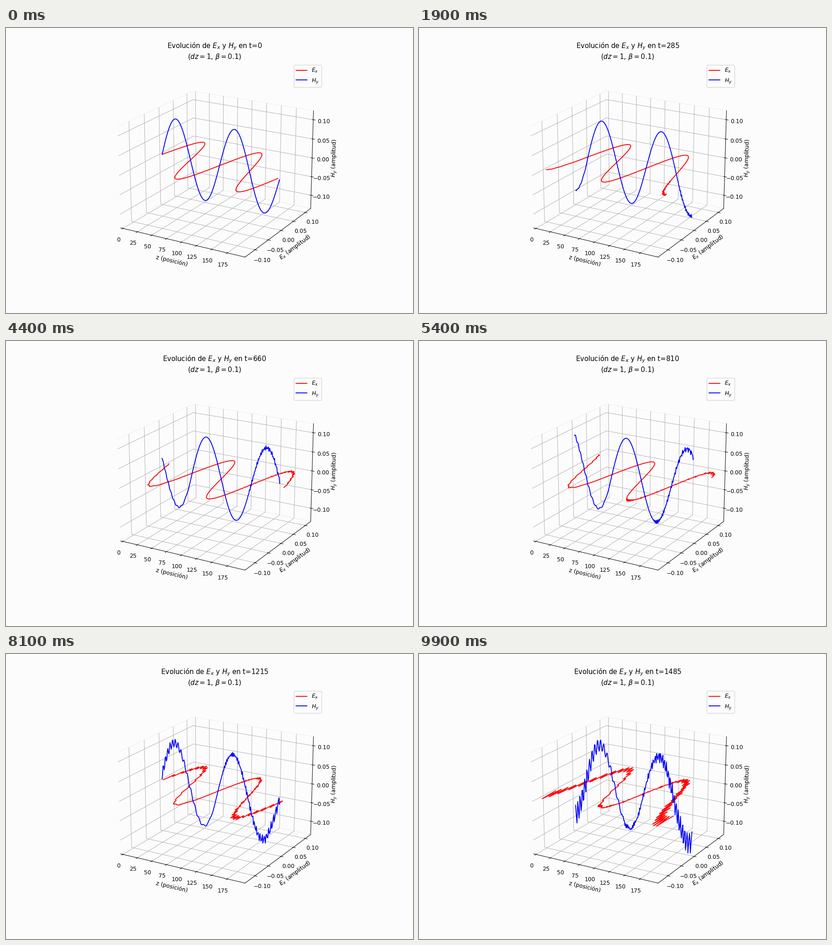
A matplotlib script that plays this animation: 894x626 px, repeating every 10 s.

```python
import numpy as np
import matplotlib.pyplot as plt
from matplotlib.animation import FuncAnimation

FRAMES, STEPS, CELLS = 100, 15, 200
COUPLING = 0.04
PAPER = "#fcfcfc"


def advance(a, b):
    """One explicit step of field a driven by b, with wrapped ends."""
    new = a.copy()
    new[1:-1] += COUPLING * (b[:-2] - b[2:])
    new[[0, -1]] += COUPLING * (b[-2] - b[1])
    return new


def simulate():
    z = np.arange(CELLS)
    ex = 0.1 * np.sin(2 * np.pi * z / 100)
    hy = ex.copy()
    history = []
    for step in range(FRAMES * STEPS):
        if step % STEPS == 0:
            history.append((ex, hy))
        ex, hy = advance(ex, hy), advance(hy, ex)
    return z, np.array(history)


def padded(lo, hi):
    pad = (hi - lo) / 48
    return lo - pad, hi + pad


z, fields = simulate()
zero = np.zeros(CELLS)

plt.rcParams.update({"figure.facecolor": PAPER, "axes.facecolor": PAPER})
fig = plt.figure(figsize=(10, 7.0023), dpi=89.4)
ax = fig.add_subplot(projection="3d")
ax.view_init(elev=20, azim=-60)

e_line, = ax.plot(z, fields[0, 0], zero, color="red", label="$E_x$")
h_line, = ax.plot(z, zero, fields[0, 1], color="blue", label="$H_y$")

ax.set_xlim(*padded(0, CELLS - 1))
ax.set_ylim(*padded(fields[:, 0].min(), fields[:, 0].max()))
ax.set_zlim(*padded(fields[:, 1].min(), fields[:, 1].max()))
ax.set_xticks(np.arange(0, 176, 25))
amp_ticks = np.linspace(-0.1, 0.1, 5)
ax.set_yticks(amp_ticks)
ax.set_zticks(amp_ticks)
ax.set_xlabel("z (posición)")
ax.set_ylabel("$E_x$ (amplitud)")
ax.set_zlabel("$H_y$ (amplitud)")
ax.legend(loc="upper right")

for axis in (ax.xaxis, ax.yaxis, ax.zaxis):
    axis.set_pane_color((*plt.matplotlib.colors.to_rgb(PAPER), 1))
    axis.pane.set_edgecolor("#f1f1f1")


def update(i):
    ex, hy = fields[i]
    e_line.set_data_3d(z, ex, zero)
    h_line.set_data_3d(z, zero, hy)
    ax.set_title(f"Evolución de $E_x$ y $H_y$ en t={i * STEPS}\n"
                 r"($dz = 1$, $\beta = 0.1$)")
    return e_line, h_line


anim = FuncAnimation(fig, update, frames=FRAMES, interval=100,
                     repeat=True, repeat_delay=0, blit=False)
plt.show()
```
